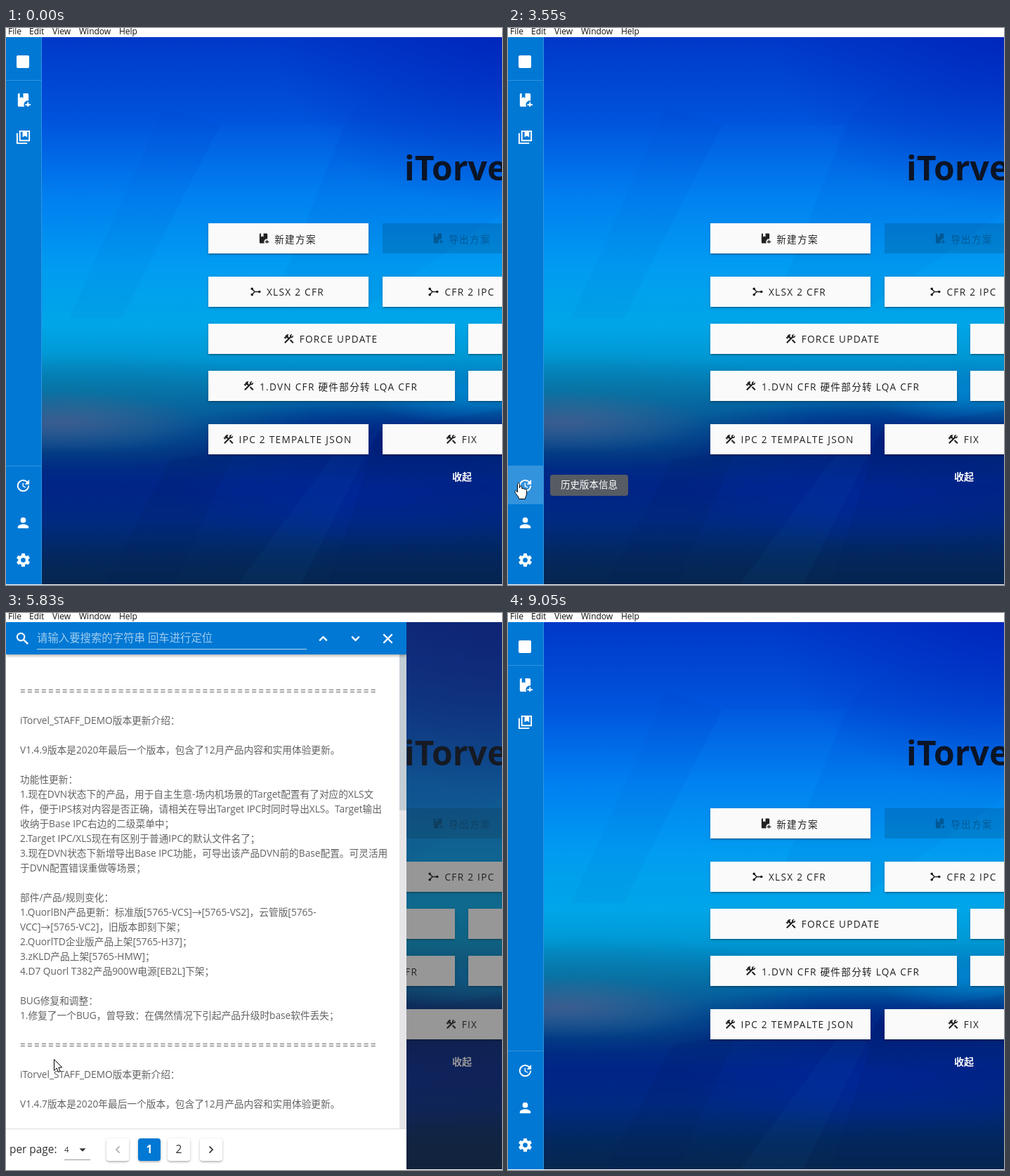
Animation of 706x793 px, one loop 9370 ms. Source, as an HTML page:

```html
<!DOCTYPE html>
<html lang="zh-CN">
<head>
<meta charset="utf-8">
<title>Version history drawer</title>
<style>
html, body { margin: 0; width: 100%; height: 100%; overflow: hidden; background: #fff; }
body, #stage { font-family: "Open Sans", "Noto Sans CJK SC", "Noto Sans CJK", sans-serif; }
#stage { position: relative; width: 706px; height: 793px; overflow: hidden; background: #fff; }
#stage div, #stage span, #stage svg { position: absolute; box-sizing: border-box; }
#stage span { white-space: pre; }
svg { overflow: visible; fill: currentColor; }
.menu { top: -4px; font-size: 12px; line-height: 17px; color: #111; }
#app { left: 0; top: 13px; width: 706px; height: 779px; overflow: hidden; }
#app > * { margin-top: -13px; }
#wall { left: 50px; top: 13px; width: 656px; height: 779px; background:
  radial-gradient(ellipse 330px 250px at 660px 0, rgba(0,20,175,.5), transparent),
  radial-gradient(ellipse 200px 44px at 30px 548px, rgba(92,92,140,.6), transparent),
  radial-gradient(ellipse 330px 85px at 60px 530px, rgba(20,115,150,.65), transparent),
  radial-gradient(ellipse 150px 48px at 610px 505px, rgba(0,135,215,.75), transparent),
  radial-gradient(ellipse 360px 60px at 510px 575px, rgba(0,20,125,.75), transparent),
  radial-gradient(ellipse 300px 70px at 470px 655px, rgba(0,38,160,.65), transparent),
  linear-gradient(#0038c8, #0052dc 115px, #0080f0 230px, #009cf0 330px, #00a6e8 410px,
    #0098d4 455px, #0076b2 500px, #004c98 545px, #003080 592px, #002488 640px,
    #002a80 690px, #03285f 738px, #06264f); }
#title { left: 567px; top: 166px; font-size: 48px; line-height: 66px; font-weight: 700; color: #0b1426; }
#buttons, #notes { left: 0; top: 0; }
.btn { height: 43px; display: flex; align-items: center; justify-content: center; background: #fafafa;
  color: rgba(0,0,0,.87); font-size: 13.6px; letter-spacing: 1.3px;
  box-shadow: 0 3px 1px -2px rgba(0,0,0,.2), 0 2px 2px rgba(0,0,0,.14), 0 1px 5px rgba(0,0,0,.12); }
#stage .btn svg, #stage .btn span { position: static; }
.btn svg { margin: 0 7px 0 -4px; }
.btn.off { background: rgba(0,0,0,.13); color: rgba(0,0,0,.28); box-shadow: none; }
#less { left: 635px; top: 629px; font-size: 14px; line-height: 20px; font-weight: 700; color: #fff; }
#side { left: 0; top: 13px; width: 51px; height: 779px; background: #0078d4; color: #fff;
  border-right: 1px solid rgba(255,255,255,.2); }
#side .rule { left: 0; width: 50px; height: 1px; background: rgba(255,255,255,.2); }
#logo { left: 15px; top: 26px; width: 18px; height: 18px; border-radius: 2px; background: #fff; }
#hover { left: 0; top: 611px; width: 50px; height: 54px; background: rgba(255,255,255,.2); }
#tip { left: 60px; top: 636px; width: 111px; height: 30px; padding-left: 15px; border-radius: 4px;
  background: rgba(97,97,97,.9); color: #fff; font-size: 13.5px; line-height: 29px; }
#shade { left: 0; top: 13px; width: 706px; height: 779px; background: #212121; }
#drawer { left: 0; top: 13px; width: 570px; height: 779px; background: #fff; overflow: hidden; }
#drawer > * { margin-top: -13px; }
#bar { left: 0; top: 13px; width: 570px; height: 46px; background: #0078d4; color: #fff;
  box-shadow: 0 2px 4px rgba(0,0,0,.3); }
#ask { left: 44px; top: 11px; font-size: 15.4px; line-height: 24px; color: rgba(255,255,255,.62); }
#line { left: 44px; top: 38px; width: 384px; height: 1px; background: rgba(255,255,255,.7); }
#notes span { left: 20px; font-size: 13.7px; line-height: 21px; color: #626262; }
#notes .sep { letter-spacing: 2.15px; }
#track { left: 560px; top: 59px; width: 10px; height: 676px; background: #e6e6e9; }
#thumb { left: 560px; top: 59px; width: 10px; height: 222px; background: #c3cdd5; }
#foot { left: 0; top: 734px; width: 570px; height: 58px; background: #fff; border-top: 1px solid #ddd; color: #333; }
#foot .page { top: 13px; width: 32px; height: 32px; border-radius: 4px; text-align: center; font-size: 15.4px;
  line-height: 32px; box-shadow: 0 2px 2px rgba(0,0,0,.16), 0 1px 4px rgba(0,0,0,.16); }
#foot .on { background: #0078d4; color: #fff; font-weight: 700; }
#cursor { left: 0; top: 0; }
</style>
</head>
<body>
<div id="stage">
  <div id="app">
    <div id="wall"><svg width="656" height="779">
      <path fill="#003090" opacity=".035" d="M175 100 255 125 115 400 40 400ZM440 110 500 60 656 60V250L470 380H330Z"/>
      <path fill="#30b0ff" opacity=".03" d="M255 125H430L330 380H120ZM420 590 480 560 370 779H280Z"/>
      <path fill="#001a50" opacity=".1" d="M185 600 275 590 190 779H90ZM480 560 656 530V779H410Z"/>
    </svg></div>
    <span id="title">iTorvel</span>
    <div id="buttons"></div>
    <span id="less">收起</span>
    <div id="side">
      <div id="logo"></div>
      <div class="rule" style="top:61px"></div>
      <div class="rule" style="top:610px"></div>
      <div id="hover"></div>
    </div>
    <div id="tip">历史版本信息</div>
    <div id="shade"></div>
    <div id="drawer">
      <div id="notes"></div>
      <div id="track"></div><div id="thumb"></div>
      <div id="bar"><span id="ask">请输入要搜索的字符串 回车进行定位</span><div id="line"></div></div>
      <div id="foot">
        <span style="left:5px;top:17px;font-size:15.4px;line-height:24px">per page:</span>
        <span style="left:83px;top:20px;font-size:11.5px;line-height:18px">4</span>
        <div style="left:83px;top:43px;width:37px;height:1px;background:#999"></div>
      </div>
    </div>
  </div>
  <svg id="cursor" width="24" height="26" stroke="#000" stroke-linejoin="round">
    <path id="arrow" fill="#fff" d="M.5 .5V16.5L4.2 13 6.6 18.6 9.2 17.5 6.8 12H11.8Z"/>
    <path id="hand" fill="#fff" d="M-1.5 1.5C-1.5-.5 1.5-.5 1.5 1.5V7C3-.1 5 6.5 5 8 6.5 6.8 8.3 7.5 8.3 9 10 8 11.5 9 11.5 10.5V15C11.5 18 9.5 19 9.5 22.5H.5C.5 19-3 17-5 13-6 11-4 10-2.8 11.5L-1.5 13Z"/>
  </svg>
</div>
<script>
const $ = id => document.getElementById(id);
const add = (parent, html) => parent.insertAdjacentHTML('beforeend', html);

const tooth = a => `<path transform="rotate(${a} 12 12)" d="M9 6 9.6 2.4Q9.7 2 10.2 2H13.8Q14.3 2 14.4 2.4L15 6Z"/>`;
const stroke = (d, w = 2) => `<path d="${d}" fill="none" stroke="currentColor" stroke-width="${w}"/>`;
const icons = {
  bookPlus: '<path d="M13 19C13 20.1 13.3 21.1 13.8 22H6C4.9 22 4 21.1 4 20V4C4 2.9 4.9 2 6 2H7V9L9.5 7.5 12 9V2H18C19.1 2 20 2.9 20 4V13.1C16 12.4 13 15.5 13 19M20 18V15H18V18H15V20H18V22H20V20H23V18Z"/>',
  books: stroke('M3 6V21H18M7 3H21V17H7Z') + '<path d="M11 3H18V12L14.5 10 11 12Z"/>',
  update: '<path d="M21 10.1H14.2L17 7.3C14.2 4.6 9.8 4.5 7.1 7.2 4.3 9.9 4.3 14.3 7.1 17 9.8 19.7 14.2 19.7 17 17 18.3 15.6 19 14.1 19 12.1H21C21 14.1 20.1 16.6 18.4 18.4 14.8 21.9 9.2 21.9 5.6 18.4 2.1 14.9 2.1 9.3 5.6 5.8 9.1 2.3 14.8 2.3 18.3 5.8L21 3ZM12.5 8V12.2L16 14.3 15.3 15.5 11 13V8Z"/>',
  user: '<circle cx="12" cy="8" r="4"/><path d="M12 14C16.4 14 20 15.8 20 18V20H4V18C4 15.8 7.6 14 12 14Z"/>',
  cog: '<circle cx="12" cy="12" r="5.5" fill="none" stroke="currentColor" stroke-width="4"/>' + [0, 60, 120, 180, 240, 300].map(tooth).join(''),
  merge: stroke('M4 6 10 12H20M4 18 10 12', 2.2) + '<circle cx="4.5" cy="6" r="2.5"/><circle cx="4.5" cy="18" r="2.5"/><circle cx="19.5" cy="12" r="2.5"/>',
  tools: '<path d="M13.8 15.3 19.8 21.3 21.9 19.1 15.9 13.1ZM17.5 10.1C17.1 10.1 16.7 10 16.4 9.9L5 21.2 2.9 19.1 10.3 11.7 8.5 10 7.8 10.7 6.3 9.2V12.1L5.6 12.8 2.1 9.2 2.8 8.5H5.6L4.2 7.1 7.8 3.6C9 2.4 10.8 2.4 12 3.6L9.9 5.7 11.3 7.1 10.6 7.8 12.4 9.6 14.2 7.7C13.3 5 15.5 2.3 19.1 3.5L16.4 6.2 17.9 7.7 20.6 5C22 7.5 20 10.1 17.5 10.1Z"/>',
  search: '<circle cx="9.5" cy="9.5" r="5.5" fill="none" stroke="currentColor" stroke-width="2.2"/>' + stroke('M14 14 20 20', 2.6),
  up: stroke('M6.5 15 12 9.5 17.5 15', 2.3),
  down: stroke('M6.5 9 12 14.5 17.5 9', 2.3),
  left: stroke('M15 6.5 9.5 12 15 17.5'),
  right: stroke('M9 6.5 14.5 12 9 17.5'),
  close: stroke('M5.5 5.5 18.5 18.5M18.5 5.5 5.5 18.5', 2.5),
  caret: '<path d="M7 10H17L12 15Z"/>'
};
const icon = (name, size, style = '') =>
  `<svg width="${size}" height="${size}" viewBox="0 0 24 24" style="${style}">${icons[name]}</svg>`;
const place = (parent, name, x, y, size = 23) =>
  add(parent, icon(name, size, `left:${x - size / 2}px;top:${y - size / 2}px`));

[['File', 3], ['Edit', 33], ['View', 66], ['Window', 104], ['Help', 161]].forEach(([label, x]) =>
  add($('stage'), `<span class="menu" style="left:${x}px">${label}</span>`));

[['bookPlus', 89], ['books', 142], ['update', 638], ['user', 691], ['cog', 744]].forEach(([name, y]) =>
  place($('side'), name, 24, y));

[
  [288, 278, 228, 'bookPlus', '新建方案'],
  [536, 278, 228, 'bookPlus', '导出方案', 'off'],
  [288, 354, 228, 'merge', 'XLSX 2 CFR'],
  [536, 354, 228, 'merge', 'CFR 2 IPC'],
  [288, 421, 351, 'tools', 'FORCE UPDATE'],
  [658, 421, 351],
  [288, 488, 351, 'tools', '1.DVN CFR 硬件部分转 LQA CFR'],
  [658, 488, 351],
  [288, 564, 228, 'tools', 'IPC 2 TEMPALTE JSON'],
  [536, 564, 228, 'tools', 'FIX']
].forEach(([x, y, w, name, label, state = '']) => add($('buttons'),
  `<div class="btn ${state}" style="left:${x}px;top:${y}px;width:${w}px">${name ? icon(name, 17) + `<span>${label}</span>` : ''}</div>`));

const rule = '='.repeat(51);
`${rule}

iTorvel_STAFF_DEMO版本更新介绍：

V1.4.9版本是2020年最后一个版本，包含了12月产品内容和实用体验更新。

功能性更新：
1.现在DVN状态下的产品，用于自主生意-场内机场景的Target配置有了对应的XLS文
件，便于IPS核对内容是否正确，请相关在导出Target IPC时同时导出XLS。Target输出
收纳于Base IPC右边的二级菜单中；
2.Target IPC/XLS现在有区别于普通IPC的默认文件名了；
3.现在DVN状态下新增导出Base IPC功能，可导出该产品DVN前的Base配置。可灵活用
于DVN配置错误重做等场景；

部件/产品/规则变化：
1.QuorlBN产品更新：标准版[5765-VCS]→[5765-VS2]，云管版[5765-
VCC]→[5765-VC2]，旧版本即刻下架；
2.QuorlTD企业版产品上架[5765-H37]；
3.zKLD产品上架[5765-HMW]；
4.D7 Quorl T382产品900W电源[EB2L]下架；

BUG修复和调整：
1.修复了一个BUG，曾导致：在偶然情况下引起产品升级时base软件丢失；

${rule}

iTorvel_STAFF_DEMO版本更新介绍：

V1.4.7版本是2020年最后一个版本，包含了12月产品内容和实用体验更新。`.split('\n').forEach((text, i) =>
  add($('notes'), `<span class="${text === rule ? 'sep' : ''}" style="top:${100 + 21 * i}px">${text}</span>`));

[['search', 23], ['up', 451], ['down', 497], ['close', 543]].forEach(([name, x]) => place($('bar'), name, x, 23));
[[143, ''], [188, '1', 'on'], [230, '2'], [276, '']].forEach(([x, text, state = '']) =>
  add($('foot'), `<div class="page ${state}" style="left:${x}px">${text}</div>`));
add($('foot'), icon('left', 20, 'left:149px;top:19px;opacity:.4') + icon('right', 20, 'left:282px;top:19px'));
place($('foot'), 'caret', 109, 29, 22);

const LOOP = 9370, FIRST = 70, STEP = 77, LAST = 9050;

// cursor path: time, x, y
const path = [
  [70, 250, 800], [600, 18, 650], [1300, 18, 650], [1500, 34, 637], [1900, 680, 330], [2145, 629, 206],
  [2400, 545, 27], [2560, 545, 30], [3250, 15, 648], [3800, 15, 648], [4300, 650, 490], [4520, 650, 490],
  [5040, 24, 616], [5200, 20, 648], [5680, 20, 648], [6200, 650, 480], [6480, 650, 480], [6890, 163, 463],
  [7180, 18, 648], [7640, 18, 648], [8060, 642, 510], [8460, 642, 510], [8900, 590, 800]
];
// drawer: opens at, closes at
const visits = [[1000, 2540], [3640, 4460], [5430, 6420], [7420, 8390]];
// tooltip: appears at, leaves at
const tips = [[600, 1060], [3240, 3700], [5190, 5490], [7170, 7480]];

const clamp = v => Math.min(1, Math.max(0, v));
const smooth = v => v * v * (3 - 2 * v);
const out = v => 1 - (1 - v) ** 2;
const ramp = (t, spans, length, ease) => Math.max(...spans.map(([a, b]) =>
  ease(clamp((t - a) / length)) * (1 - ease(clamp((t - b) / length)))));

function cursorAt(t) {
  const i = path.findIndex(p => p[0] > t);
  if (i < 1) return null;
  const [t0, x0, y0] = path[i - 1], [t1, x1, y1] = path[i];
  const k = smooth((t - t0) / (t1 - t0));
  return [x0 + (x1 - x0) * k, y0 + (y1 - y0) * k];
}

function render(time) {
  const t = time < FIRST ? 0 : Math.min(LAST, FIRST + Math.floor((time - FIRST) / STEP) * STEP);
  const open = ramp(t, visits, 230, smooth);
  const shade = ramp(t, visits, 300, out);
  const pos = cursorAt(t);
  const onItem = !!pos && pos[0] < 50 && pos[1] > 624 && pos[1] < 678 && open < .1;
  $('drawer').style.transform = `translateX(${Math.round((open - 1) * 570)}px)`;
  $('drawer').style.visibility = open > 0 ? 'visible' : 'hidden';
  $('shade').style.opacity = .46 * shade;
  $('tip').style.opacity = ramp(t, tips, 150, smooth);
  $('hover').style.opacity = onItem ? 1 : 0;
  $('cursor').style.visibility = pos ? 'visible' : 'hidden';
  $('arrow').style.display = onItem ? 'none' : '';
  $('hand').style.display = onItem ? '' : 'none';
  if (pos) $('cursor').style.transform = `translate(${Math.round(pos[0])}px,${Math.round(pos[1])}px)`;
}

const start = performance.now();
function tick() {
  render((performance.now() - start) % LOOP);
  requestAnimationFrame(tick);
}
tick();
</script>
</body>
</html>
```
